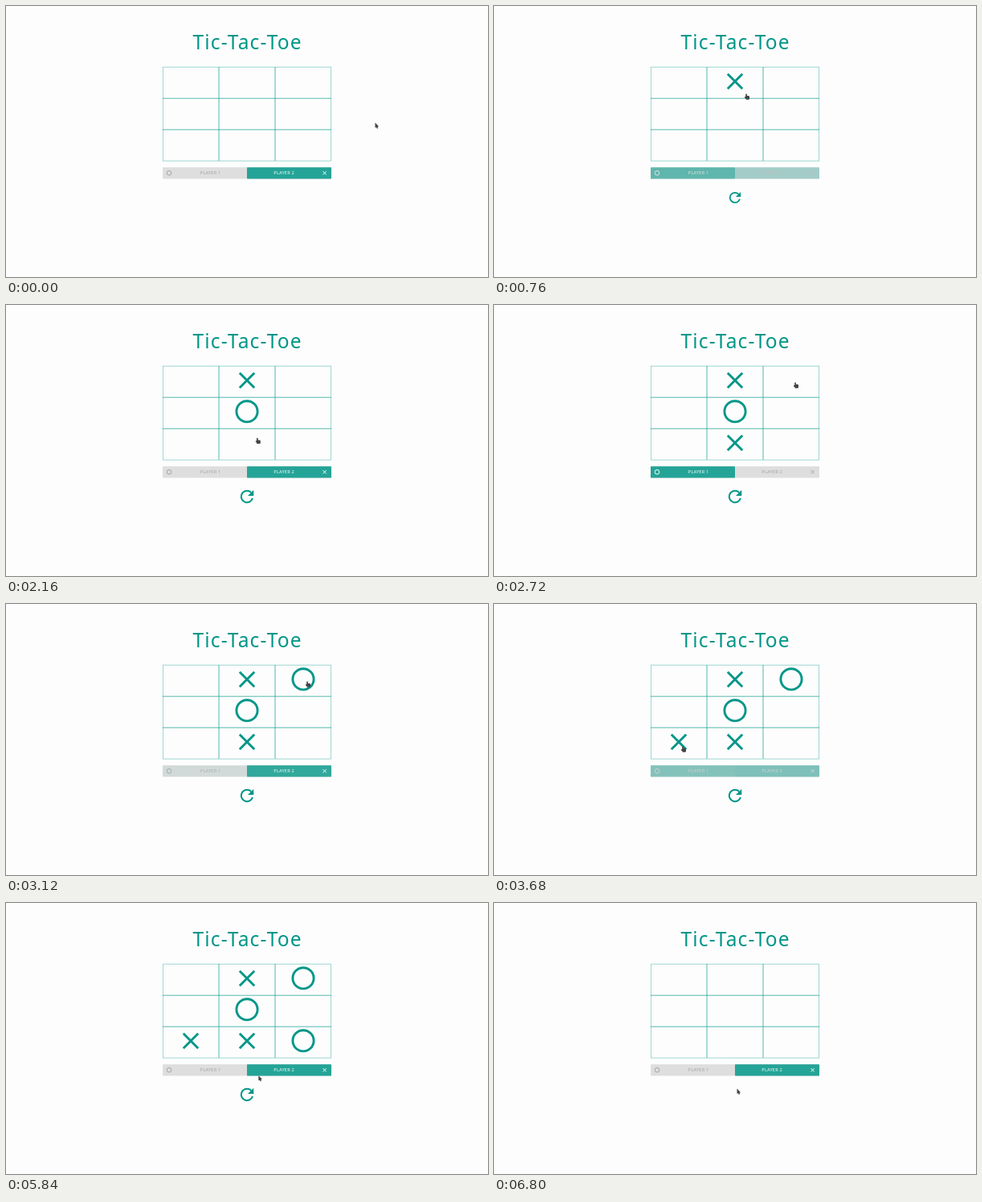
An HTML page with a canvas for the animation above (7240 ms loop, 600 by 338 pixels).

```html
<!DOCTYPE html>
<html lang="en">
<head>
<meta charset="utf-8">
<title>Tic-Tac-Toe</title>
<style>
  html, body { margin: 0; width: 100%; height: 100%; overflow: hidden; background: #fdfdfd; }
  canvas { display: block; width: 600px; height: 338px; }
</style>
</head>
<body>
<canvas id="stage"></canvas>
<script>
const LOOP = 7240, STEP = 40;
const TEAL = '#009688';
const FONT = '"Noto Sans", "Open Sans", sans-serif';
const LEFT = 195, TOP = 76, CELL_W = 70, CELL_H = 39;
const MIDDLE = LEFT + 1.5 * CELL_W;

const canvas = document.getElementById('stage');
const ctx = canvas.getContext('2d');
const dpr = window.devicePixelRatio || 1;
canvas.width = 600 * dpr;
canvas.height = 338 * dpr;

// Where the pointer stops, when it arrives and when it clicks
const stop = (arrive, x, y, click) => ({ arrive, x, y, click });
const home = stop(0, 461, 149);
const moves = [
  stop(560, 315, 113, 610),
  stop(1120, 323, 140, 1441),
  stop(2250, 311, 178, 2270),
  stop(2700, 376, 100, 2885),
  stop(3540, 236, 181, 3580),
  stop(4660, 360, 173, 4885)
];
const reset = stop(5960, 298, 237, 6300);
const stops = [...moves, reset, stop(6680, 304, 235)];

const mix = (a, b, p) => a + (b - a) * p;
const clamp = v => Math.min(1, Math.max(0, v));
const smooth = p => p * p * (3 - 2 * p);

function bezier(x1, y1, x2, y2) {
  const at = (a, b, s) => 3 * (1 - s) * (1 - s) * s * a + 3 * (1 - s) * s * s * b + s * s * s;
  return x => {
    let lo = 0, hi = 1;
    for (let i = 0; i < 20; i++) {
      const mid = (lo + hi) / 2;
      if (at(x1, x2, mid) < x) lo = mid; else hi = mid;
    }
    return at(y1, y2, hi);
  };
}
const easeOut = bezier(0, 0, 0.58, 1);
const bounce = bezier(0.53, 0.01, 0.36, 1.63);
const since = (t, start) => clamp((t - start) / 300);

function blend(a, b, p) {
  return `rgb(${a.map((v, i) => Math.round(mix(v, b[i], p))).join(',')})`;
}

// Longer trips take a little more time
function pointer(t) {
  let { x, y } = home;
  for (const s of stops) {
    const travel = 250 + Math.hypot(s.x - x, s.y - y);
    const p = smooth(clamp((t - s.arrive + travel) / travel));
    x = mix(x, s.x, p);
    y = mix(y, s.y, p);
    if (p < 1) break;
  }
  return { x, y };
}

function line(x0, y0, x1, y1) {
  ctx.beginPath();
  ctx.moveTo(x0, y0);
  ctx.lineTo(x1, y1);
  ctx.stroke();
}

function cross(x, y, r, width) {
  ctx.lineWidth = width;
  line(x - r, y - r, x + r, y + r);
  line(x - r, y + r, x + r, y - r);
}

function ring(x, y, r, width) {
  ctx.lineWidth = width;
  ctx.beginPath();
  ctx.arc(x, y, r, 0, Math.PI * 2);
  ctx.stroke();
}

function triangle(x, y, w, h) {
  ctx.beginPath();
  ctx.moveTo(x, y);
  ctx.lineTo(x + w, y);
  ctx.lineTo(x + w, y + h);
  ctx.fill();
}

function text(str, x, y, size, spacing) {
  ctx.font = `${size}px ${FONT}`;
  ctx.letterSpacing = spacing + 'px';
  ctx.textAlign = 'center';
  ctx.fillText(str, x + spacing / 2, y);
}

function grid() {
  const w = 3 * CELL_W, h = 3 * CELL_H;
  ctx.strokeStyle = TEAL;
  ctx.lineWidth = 0.9;
  ctx.globalAlpha = 0.42;
  ctx.strokeRect(LEFT + 0.4, TOP + 0.2, w - 0.8, h);
  ctx.globalAlpha = 0.75;
  for (let i = 1; i < 3; i++) {
    const x = LEFT + i * CELL_W, y = TOP + i * CELL_H + 0.2;
    line(x, TOP, x, TOP + h);
    line(LEFT, y, LEFT + w, y);
  }
  ctx.globalAlpha = 1;
}

// Players take turns, so every second mark is a ring
function marks(t) {
  if (t >= reset.click) return;
  ctx.strokeStyle = TEAL;
  moves.forEach((m, i) => {
    if (t < m.click) return;
    const col = Math.floor((m.x - LEFT) / CELL_W);
    const row = Math.floor((m.y - TOP) / CELL_H);
    const x = LEFT + (col + 0.5) * CELL_W, y = TOP + (row + 0.5) * CELL_H - 1.5;
    if (i % 2) ring(x, y - 0.2, 13.1, 2.9);
    else cross(x, y, 9.2, 2.9);
  });
}

// 0: player 1 active, 1: player 2 active
function turn(t) {
  const last = moves.filter(m => m.click <= t).length - 1;
  if (last < 0) return 1;
  const p = easeOut(since(t, moves[last].click));
  return last % 2 ? p : 1 - p;
}

function button(x, active, label, labelX) {
  ctx.save();
  ctx.shadowColor = `rgba(0,0,0,${0.15 * active})`;
  ctx.shadowBlur = dpr;
  ctx.shadowOffsetY = 0.3 * dpr;
  ctx.fillStyle = blend([222, 222, 222], [36, 164, 151], active);
  ctx.beginPath();
  ctx.roundRect(x, 201.3, 105, 14.1, 0.6);
  ctx.fill();
  ctx.restore();
  ctx.fillStyle = ctx.strokeStyle = blend([164, 164, 164], [255, 255, 255], active);
  text(label, labelX, 210.4, 5.5, 0.25);
}

function bar(t) {
  const p = turn(t);
  button(LEFT, 1 - p, 'PLAYER 1', 254.5);
  ring(203, 208.3, 2.8, 1);
  button(MIDDLE, p, 'PLAYER 2', 346);
  cross(396.6, 208.3, 2.1, 1);
}

function refresh(t) {
  const size = bounce(since(t, moves[0].click)) - bounce(since(t, reset.click + STEP));
  if (size <= 0) return;
  ctx.save();
  ctx.translate(MIDDLE, 239);
  ctx.scale(size * 1.03, size * 1.03);
  ctx.strokeStyle = ctx.fillStyle = TEAL;
  ctx.lineWidth = 2;
  ctx.beginPath();
  ctx.arc(0, 0, 7, 0.28, Math.PI * 1.75);
  ctx.stroke();
  ctx.beginPath();
  ctx.moveTo(1, -1);
  ctx.lineTo(8, -1);
  ctx.lineTo(8, -8);
  ctx.fill();
  ctx.restore();
}

function hand() {
  ctx.beginPath();
  ctx.roundRect(-1.8, -3.6, 1.7, 5, 0.8);
  ctx.roundRect(-1.8, -0.9, 4.8, 4.7, 1.2);
  ctx.roundRect(-3, 0, 2.4, 2, 0.8);
  ctx.fill();
}

function arrow() {
  ctx.beginPath();
  ctx.moveTo(-1.5, -3.4);
  ctx.lineTo(3, 1.2);
  ctx.lineTo(-1.5, 2.8);
  ctx.fill();
  ctx.lineWidth = 1.5;
  line(0, 0.5, 1.5, 3.6);
}

function cursor(t) {
  const { x, y } = pointer(t);
  const onBoard = Math.abs(x - MIDDLE) < 1.5 * CELL_W && y > TOP && y < 216;
  const onRefresh = y > 228 && t < reset.click + 240;
  ctx.save();
  ctx.translate(x, y);
  ctx.fillStyle = ctx.strokeStyle = '#444';
  if (onBoard || onRefresh) hand(); else arrow();
  ctx.restore();
}

function draw(t) {
  ctx.setTransform(dpr, 0, 0, dpr, 0, 0);
  ctx.fillStyle = '#fdfdfd';
  ctx.fillRect(0, 0, 600, 338);
  ctx.fillStyle = TEAL;
  text('Tic-Tac-Toe', MIDDLE, 54, 24.5, 1.2);
  grid();
  marks(t);
  bar(t);
  refresh(t);
  cursor(t);
}

const start = performance.now();
function tick() {
  const t = (performance.now() - start) % LOOP;
  draw(Math.floor(t / STEP) * STEP);
  requestAnimationFrame(tick);
}
tick();
</script>
</body>
</html>
```
